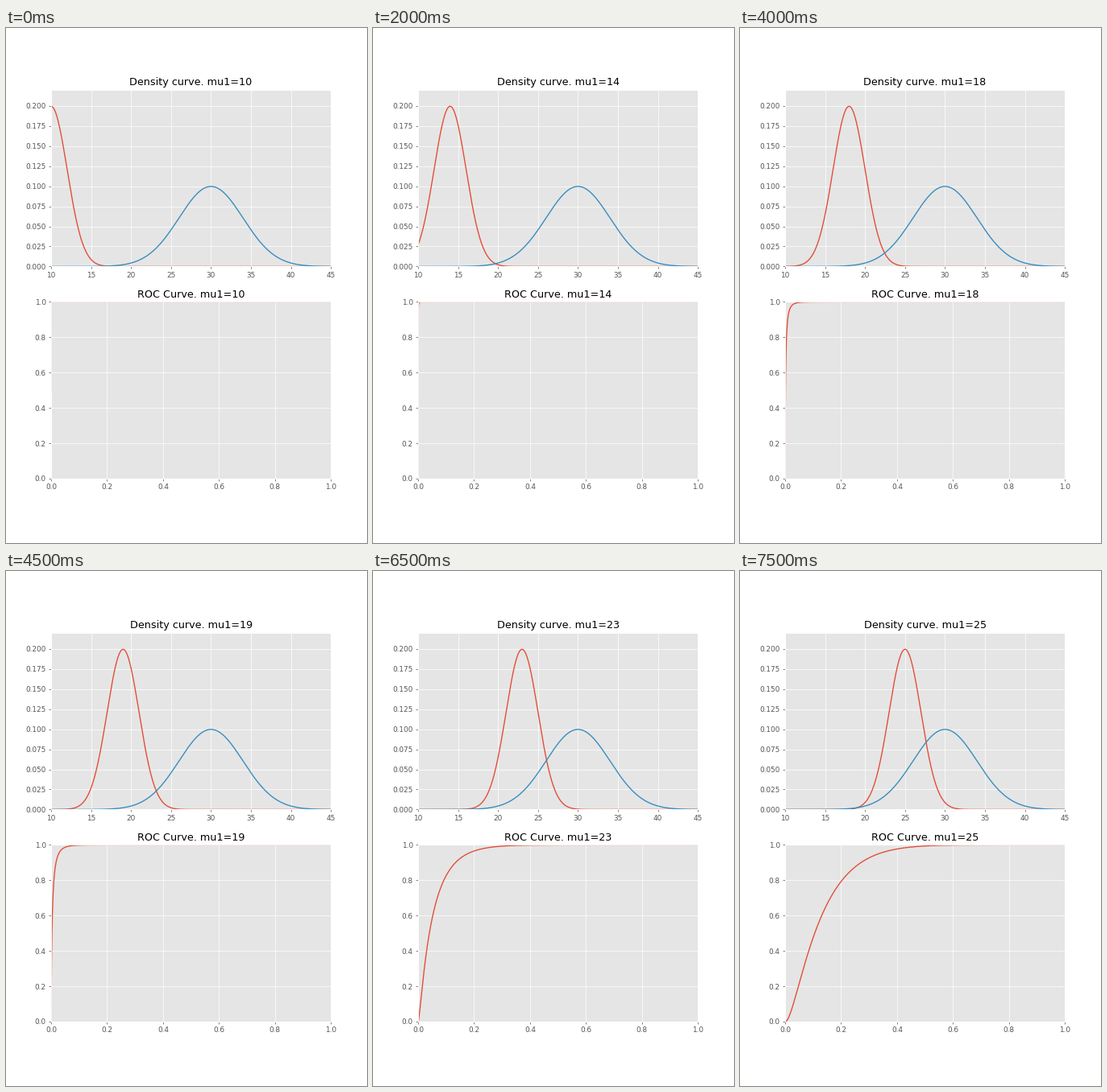
A matplotlib script for the animation above (8000 ms loop, 448x640 px).

```python
import math

import numpy as np
import matplotlib.pyplot as plt
from matplotlib.animation import FuncAnimation

plt.style.use("ggplot")
plt.rcParams["font.family"] = "DejaVu Sans"

FRAMES, INTERVAL = 16, 500
MU_START, SIGMA1 = 10, 2
MU2, SIGMA2 = 30, 4

x = np.linspace(10, 45, 1000)
erf = np.vectorize(math.erf)


def pdf(mu, sigma):
    z = (x - mu) / sigma
    return np.exp(-z * z / 2) / (sigma * math.sqrt(2 * math.pi))


def cdf(mu, sigma):
    return (1 + erf((x - mu) / (sigma * math.sqrt(2)))) / 2


fig, (density, roc) = plt.subplots(2, 1, figsize=(7, 10), dpi=64)
fig.subplots_adjust(left=0.125, right=0.9, bottom=0.125, top=0.88, hspace=0.2)

density.set(xlim=(10, 45), ylim=(0, 0.22),
            xticks=np.arange(10, 46, 5), yticks=np.arange(9) * 0.025)
density.yaxis.set_major_formatter("{x:.3f}")

ticks = np.arange(6) / 5
roc.set(xlim=(0, 1), ylim=(0, 1), xticks=ticks, yticks=ticks)

moving, = density.plot([], [], color="#E24A33", lw=1.5)
density.plot(x, pdf(MU2, SIGMA2), color="#348ABD", lw=1.5)
roc_line, = roc.plot([], [], color="#E24A33", lw=1.5)
base_cdf = cdf(MU2, SIGMA2)


def update(frame):
    mu1 = MU_START + frame
    moving.set_data(x, pdf(mu1, SIGMA1))
    roc_line.set_data(base_cdf, cdf(mu1, SIGMA1))
    density.set_title(f"Density curve. mu1={mu1}")
    roc.set_title(f"ROC Curve. mu1={mu1}")
    return moving, roc_line


anim = FuncAnimation(fig, update, frames=FRAMES, interval=INTERVAL,
                     init_func=lambda: update(0), repeat=True, repeat_delay=0)
plt.show()
```
